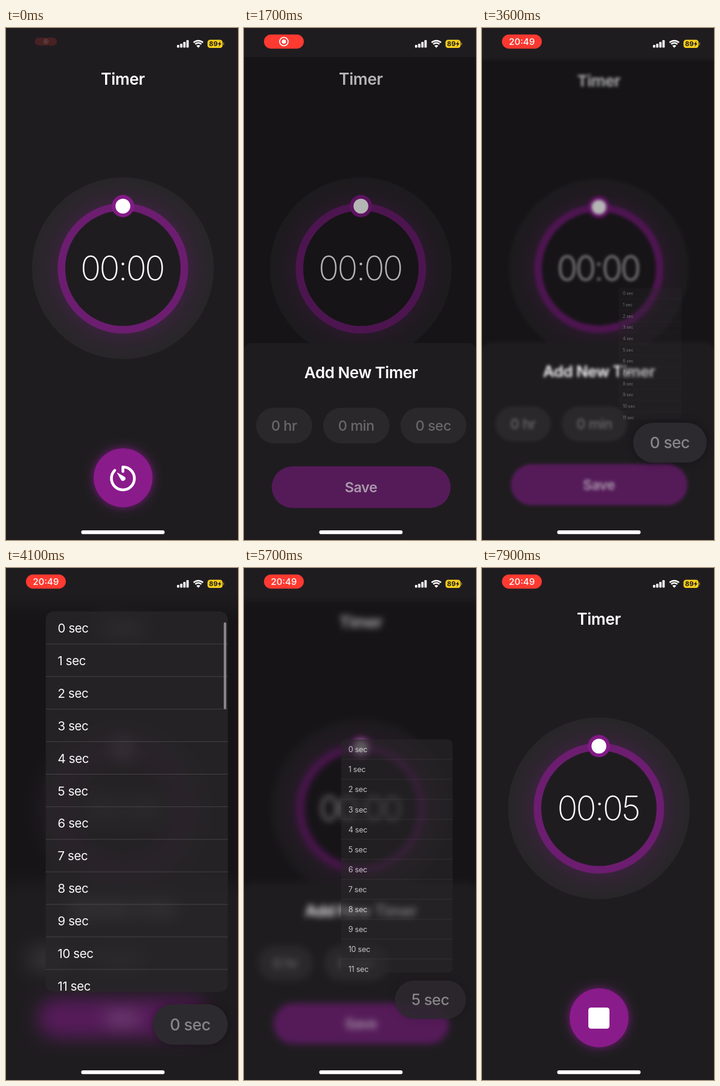
An HTML page with a canvas that plays this animation: 384 by 848 pixels, repeating every 8 s.

```html
<!DOCTYPE html>
<html lang="en">
<head>
<meta charset="utf-8">
<title>Timer</title>
<style>
html, body { margin: 0; width: 100%; height: 100%; overflow: hidden; background: #1f1c20; }
canvas { display: block; width: 384px; height: 848px; }
</style>
</head>
<body>
<canvas id="stage" width="384" height="848"></canvas>
<script>
const W = 384, H = 848, PAD = 60, LOOP = 8000, TAU = Math.PI * 2;
const BG = '#1f1c20', PURPLE = '#8a1b8b', CHIP = '#2a282b';
const ctx = document.getElementById('stage').getContext('2d');
const layer = document.createElement('canvas');
layer.width = W + PAD * 2;
layer.height = H + PAD * 2;
const lctx = layer.getContext('2d');

const clamp = x => Math.min(1, Math.max(0, x));
const ramp = (t, a, b) => clamp((t - a) / (b - a));
const lerp = (a, b, k) => a + (b - a) * k;
const easeOut = x => 1 - (1 - x) ** 3;
const easeInOut = x => x * x * (3 - 2 * x);

function box(g, x, y, w, h, r, fill) {
  g.beginPath();
  g.roundRect(x, y, w, h, r);
  g.fillStyle = fill;
  g.fill();
}

function disc(g, x, y, r, fill) {
  g.beginPath();
  g.arc(x, y, r, 0, TAU);
  g.fillStyle = fill;
  g.fill();
}

function label(g, str, x, y, size, weight, fill, spacing = 0, align = 'center') {
  g.font = `${weight} ${size}px Inter, "Open Sans", sans-serif`;
  g.letterSpacing = spacing + 'px';
  g.textAlign = align;
  g.textBaseline = 'alphabetic';
  g.fillStyle = fill;
  g.fillText(str, x + (align === 'center' ? spacing / 2 : 0), y);
}

function drawDial(g, time) {
  const x = 193.5, y = 398;
  disc(g, x, y, 150.5, '#282629');
  const glow = g.createRadialGradient(x, y, 98, x, y, 148);
  glow.addColorStop(0, 'rgba(115,25,120,0.32)');
  glow.addColorStop(0.5, 'rgba(100,25,105,0.11)');
  glow.addColorStop(1, 'rgba(100,25,105,0)');
  disc(g, x, y, 150.5, glow);
  disc(g, x, y, 108, '#6c1d70');
  disc(g, x, y, 95.5, BG);
  disc(g, x, 295, 18.5, '#831a87');
  disc(g, x, 295, 12.3, '#fff');
  label(g, time, x, 418, 56, 200, '#fff', -2.6);
}

function drawTimerIcon(g, x, y) {
  g.strokeStyle = '#fff';
  g.lineWidth = 4.6;
  g.lineCap = g.lineJoin = 'round';
  g.beginPath();
  g.moveTo(x, y - 11.5);
  g.lineTo(x, y - 19);
  g.arc(x, y, 19, -Math.PI / 2, Math.PI * 1.25);
  g.stroke();
  g.beginPath();
  g.moveTo(x - 9, y - 9);
  g.lineTo(x + 3.2, y - 2);
  g.arc(x, y, 3.8, -0.5, 2.1);
  g.closePath();
  g.fillStyle = '#fff';
  g.fill();
  g.lineWidth = 1;
  g.stroke();
}

function drawButton(g, t) {
  const first = ramp(t, 780, 830) * (1 - ramp(t, 1080, 1250));
  const second = ramp(t, 7420, 7480) * (1 - ramp(t, 7580, 7780));
  g.save();
  g.globalAlpha = 1 - 0.6 * Math.max(first, second);
  g.shadowColor = 'rgba(150,25,155,0.75)';
  g.shadowBlur = 15;
  disc(g, 193.8, 745, 48.7, PURPLE);
  g.shadowBlur = 0;
  g.shadowColor = 'transparent';
  if (t < 7560) drawTimerIcon(g, 193.5, 746);
  else box(g, 176, 728, 35, 35, 4.5, '#fff');
  g.restore();
}

function drawSheet(g, t, y, lifted) {
  const ready = ramp(t, 5950, 6150);
  g.save();
  g.translate(0, y);
  box(g, -PAD, 522, W + PAD * 2, H, [10 + PAD, 10 + PAD, 0, 0], 'rgba(0,0,0,0)');
  box(g, 0, 522, W, H, [11, 11, 0, 0], BG);
  if (lifted) box(g, -PAD, 530, W + PAD * 2, H, 0, BG);
  label(g, 'Add New Timer', 194, 579.5, 26, 600, '#fff', -0.45);
  const chips = [['0 hr', 20, 93], ['0 min', 131, 110], [t > 5700 ? '5 sec' : '0 sec', 259, 109]];
  for (const [str, x, w] of chips.slice(0, lifted ? 2 : 3)) {
    box(g, x, 629, w, 59, 29.5, CHIP);
    label(g, str, x + w / 2, 667, 23.5, 500, '#69676a', -0.5);
  }
  box(g, 46, 726, 296, 69, 34.5, '#551b59');
  label(g, 'Save', 193.8, 769, 23.5, 600, '#ab99ad', -0.5);
  g.globalAlpha = ready;
  box(g, 46, 726, 296, 69, 34.5, PURPLE);
  label(g, 'Save', 193.8, 769, 23.5, 600, '#fff', -0.5);
  g.restore();
}

function drawApp(g, t, scale, lifted) {
  const shown = easeOut(ramp(t, 1100, 1550)) * (1 - easeInOut(ramp(t, 6990, 7150)));
  g.save();
  g.fillStyle = BG;
  g.fillRect(-PAD, -PAD, W + PAD * 2, H + PAD * 2);
  g.translate(W / 2, H / 2);
  g.scale(scale, scale);
  g.translate(-W / 2, -H / 2);
  label(g, 'Timer', 193.5, 93.5, 26.5, 600, '#fff', -0.4);
  drawDial(g, t < 5800 ? '00:00' : '00:05');
  drawButton(g, t);
  const dim = easeOut(ramp(t, 1100, 1550)) * (1 - easeInOut(ramp(t, 6990, 7250)));
  g.fillStyle = `rgba(0,0,0,${0.29 * dim})`;
  g.fillRect(-PAD, 48, W + PAD * 2, H + PAD);
  if (shown > 0) drawSheet(g, t, (1 - shown) * 330, lifted);
  g.restore();
}

function drawMenu(g, v) {
  const s = 0.08 + 0.92 * v;
  g.save();
  g.globalAlpha = Math.min(1, v * 1.3);
  g.translate(lerp(311, 216.5, s), lerp(620, 387, s));
  g.scale(s, s);
  g.translate(-151, -315);
  g.beginPath();
  g.roundRect(0, 0, 302, 630, 14);
  g.clip();
  g.fillStyle = 'rgba(40,38,41,0.8)';
  g.fillRect(0, 0, 302, 630);
  for (let i = 0; i < 12; i++) {
    const y = i * 53.9;
    label(g, i + ' sec', 20, y + 35, 20.5, 400, '#fbfafb', -0.4, 'left');
    g.fillStyle = 'rgba(255,255,255,0.14)';
    g.fillRect(0, y + 53.4, 302, 1);
  }
  g.globalAlpha *= ramp(v, 0.85, 1);
  box(g, 295, 18, 4, 144, 2, '#8c8a8d');
  g.restore();
}

function drawLiftedChip(g, t, u, v) {
  const s = 1 + 0.11 * u + 0.028 * v;
  g.save();
  g.translate(lerp(313.5, 305, v), lerp(658.5, 756, v));
  g.scale(s, s);
  g.shadowColor = `rgba(0,0,0,${0.35 * u})`;
  g.shadowBlur = 14;
  const a = 1 - 0.25 * v * ramp(t, 4300, 5000);
  box(g, -54.5, -29.5, 109, 59, 29.5, `rgba(45,42,47,${a})`);
  g.shadowColor = 'transparent';
  label(g, t > 5700 ? '5 sec' : '0 sec', 0, 8.5, 23.5, 500, '#878588', -0.5);
  g.restore();
}

function drawRecordPill(g, t) {
  const grow = easeOut(ramp(t, -60, 300));
  const pulse = clamp(0.5 + 0.8 * Math.cos((t - 1950) / 2000 * TAU));
  const s = lerp(0.22, 1, grow);
  const time = ramp(t, 2950, 3100);
  g.save();
  g.translate(66, 22.5);
  g.scale(s, s);
  g.globalAlpha = t < 300 ? lerp(0.02, 1, ramp(t, -60, 300)) : 1;
  box(g, -33, -11.7, 66, 23.4, 11.7,
    `rgb(${lerp(210, 255, pulse)},${lerp(50, 58, pulse)},${lerp(45, 49, pulse)})`);
  const base = g.globalAlpha;
  g.globalAlpha = base * (1 - time);
  g.strokeStyle = '#fff';
  g.lineWidth = 1.7;
  g.beginPath();
  g.arc(0, 0, 7, 0, TAU);
  g.stroke();
  disc(g, 0, 0, 3.5, '#fff');
  g.globalAlpha = base * time;
  label(g, '20:49', 0, 5.4, 15, 500, '#fff', 0);
  g.restore();
}

function drawStatus(g, t) {
  drawRecordPill(g, t);
  for (let i = 0; i < 4; i++) {
    const h = [4.5, 6.5, 9.5, 12.5][i];
    box(g, 283 + i * 5.2, 32.5 - h, 3.8, h, 1.2, '#fff');
  }
  const a = Math.PI / 4;
  g.strokeStyle = '#fff';
  g.lineCap = 'butt';
  g.lineWidth = 2.5;
  for (const r of [11, 7.2]) {
    g.beginPath();
    g.arc(318.3, 32, r, -Math.PI / 2 - a, -Math.PI / 2 + a);
    g.stroke();
  }
  g.beginPath();
  g.moveTo(318.3, 32.8);
  g.arc(318.3, 32.8, 4.6, -Math.PI / 2 - a, -Math.PI / 2 + a);
  g.fillStyle = '#fff';
  g.fill();
  box(g, 333.5, 19.5, 25, 13.5, 4.3, '#f8cf1d');
  box(g, 359.3, 24, 1.6, 4.6, 1, '#8d7a29');
  label(g, '89', 343.2, 30.4, 11, 700, '#1c1a12', -0.1);
  g.beginPath();
  [[355, 21.5], [350.6, 27], [353.2, 27], [352, 31.3], [356.6, 25.4], [353.9, 25.4]]
    .forEach(([x, y]) => g.lineTo(x, y));
  g.closePath();
  g.fillStyle = '#1c1a12';
  g.fill();
}

function draw(t) {
  const back = 1 - easeInOut(ramp(t, 5500, 5950));
  const u = easeInOut(ramp(t, 3200, 3550)) * back;
  const v = easeOut(ramp(t, 3545, 4065)) * back;
  const lifted = u > 0;
  if (lifted) {
    lctx.setTransform(1, 0, 0, 1, PAD, PAD);
    drawApp(lctx, t, 1 - 0.009 * u - 0.036 * v * v, true);
    ctx.filter = `blur(${1.5 * u + 13 * v * v}px)`;
    ctx.drawImage(layer, -PAD, -PAD);
    ctx.filter = 'none';
    if (v > 0) drawMenu(ctx, v);
    drawLiftedChip(ctx, t, u, v);
  } else {
    drawApp(ctx, t, 1, false);
  }
  drawStatus(ctx, t);
  box(ctx, 124.5, 832, 138, 6.3, 3.1, '#fff');
}

const start = performance.now();
function tick() {
  draw((performance.now() - start) % LOOP);
  requestAnimationFrame(tick);
}
tick();
</script>
</body>
</html>
```
